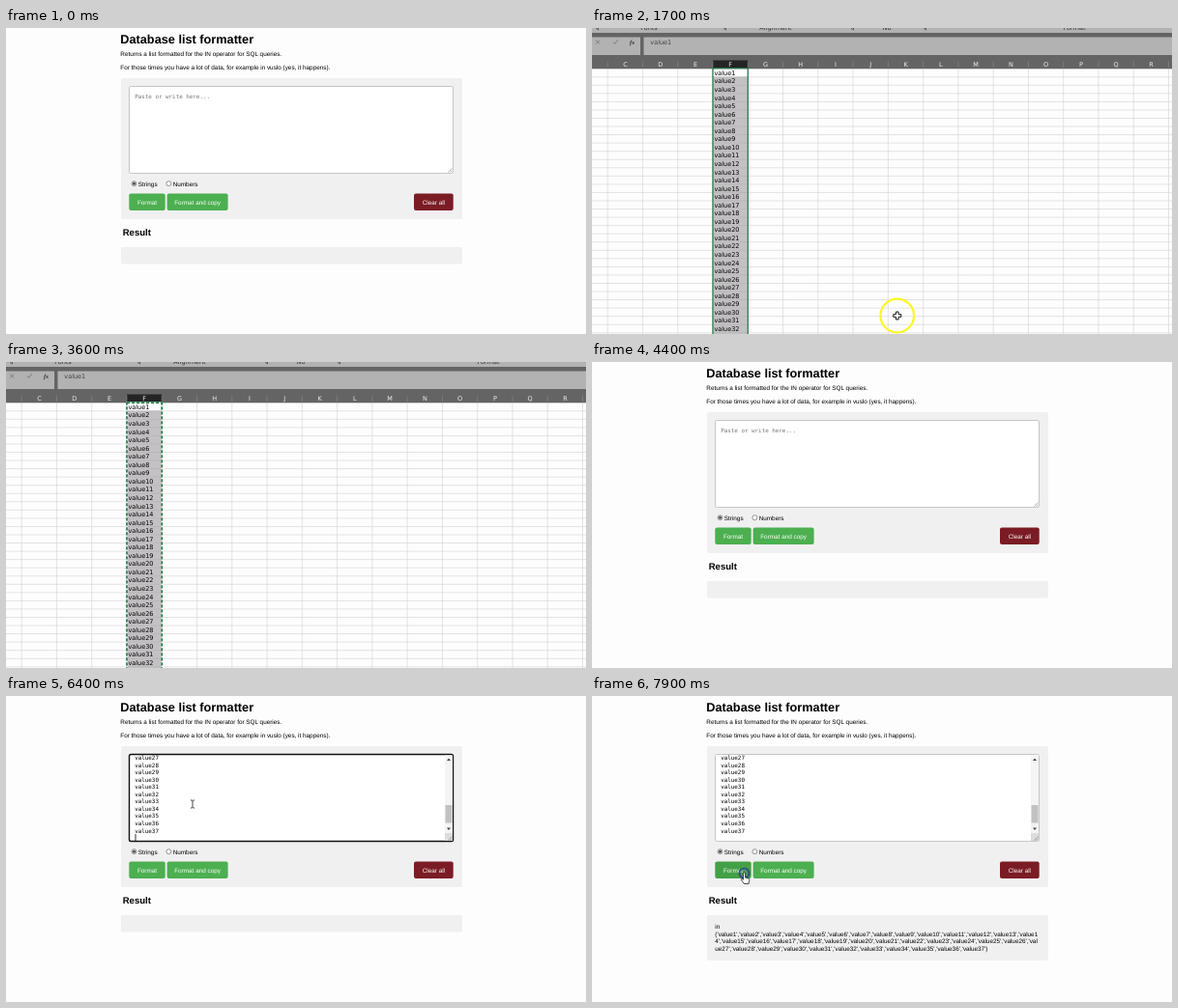
Recreate the animation shown at these times as an HTML page. Size 600x317 px, loop 8000 ms.

```html
<!DOCTYPE html>
<html lang="en">
<head>
<meta charset="utf-8">
<title>Database list formatter</title>
<style>
  html, body { margin: 0; width: 100%; height: 100%; overflow: hidden; background: #fefdfe; }
  svg { display: block; width: 600px; height: 317px; text-rendering: geometricPrecision; }
  .sans { font-family: "Liberation Sans", Arial, sans-serif; font-size: 6.37px; }
  .mono { font-family: "DejaVu Sans Mono", monospace; font-size: 5.88px; }
  .cell { font-family: "DejaVu Sans", sans-serif; font-size: 6.5px; }
</style>
</head>
<body>
<svg id="stage" viewBox="0 0 600 317"></svg>
<script>
const stage = document.getElementById('stage');
const range = (n, fn) => Array.from({ length: n }, (_, i) => fn(i)).join('');
const rect = (x, y, w, h, fill, extra = '') =>
  `<rect x="${x}" y="${y}" width="${w}" height="${h}" fill="${fill}" ${extra}/>`;
const text = (x, y, str, kind = 'sans', extra = '') =>
  `<text x="${x}" y="${y}" class="${kind}" ${extra}>${str}</text>`;
const path = (d, stroke, width = 1, extra = '') =>
  `<path d="${d}" fill="none" stroke="${stroke}" stroke-width="${width}" ${extra}/>`;
const group = (id, content) => `<g id="${id}">${content}</g>`;

// Web page
const button = (id, x, w, label, fill) =>
  rect(x, 171.5, w, 17.5, fill, `rx="2" id="${id}"`) +
  text(x + w / 2, 182.7, label, 'sans', 'fill="#fff" text-anchor="middle"');
const radio = (x, label, dot) =>
  `<circle cx="${x}" cy="161.2" r="2.5" fill="#fff" stroke="#666" stroke-width=".7"/>` +
  (dot ? `<circle cx="${x}" cy="161.2" r="1.6" fill="#555"/>` : '') + text(x + 4.3, 164, label);

const list = `('${Array.from({ length: 37 }, (_, i) => 'value' + (i + 1)).join("','")}')`;
const breaks = [0, list.indexOf("4','value15"), list.indexOf("ue27'"), list.length];
const resultLines = ['in', ...[0, 1, 2].map(i => list.slice(breaks[i], breaks[i + 1]))];

const pageMarkup =
  rect(0, 0, 600, 317, '#fefdfe') +
  text(118.3, 15.6, 'Database list formatter', 'sans', 'style="font-size:12.73px;font-weight:bold"') +
  text(118.3, 29.4, 'Returns a list formatted for the IN operator for SQL queries.') +
  text(118.3, 43.4, 'For those times you have a lot of data, for example in vuslo (yes, it happens).') +
  rect(119, 52, 353, 146, '#f1f0f1', 'rx="2"') +
  rect(127.5, 60.5, 335, 90, '#fff', 'rx="1.8" stroke="#c6c6c6" id="box"') +
  group('placeholder', text(133.2, 72.7, 'Paste or write here...', 'mono', 'fill="#757575"')) +
  group('pasted',
    '<clipPath id="inner"><rect x="128" y="61" width="334" height="89"/></clipPath>' +
    `<g clip-path="url(#inner)">${range(11, i => text(133.2, 66 + i * 7.56, 'value' + (27 + i), 'mono'))}</g>` +
    rect(454, 61.5, 8, 80.5, '#f4f4f4') + rect(454.5, 113, 7, 18.5, '#c1c1c1') +
    rect(454, 142, 8, 8, '#dcdcdc') +
    '<path d="M456 67l2-2.4 2 2.4zM456 136.6l2 2.4 2-2.4z" fill="#444"/>') +
  path('M457.5 149.5l4-4M459.8 149.5l1.7-1.7', '#777', .6) +
  rect(133.6, 143, .8, 7, '#000', 'id="caret"') +
  radio(132.5, 'Strings', true) + radio(168.4, 'Numbers') +
  button('format', 127.3, 37.4, 'Format', '#4caf50') +
  button('copy', 166.6, 63, 'Format and copy', '#4caf50') +
  button('clear', 422, 40.7, 'Clear all', '#7b1c24') +
  text(120.7, 215.2, 'Result', 'sans', 'style="font-size:9.55px;font-weight:bold"') +
  rect(119, 227, 353, 17.5, '#f1f0f1', 'rx="1.5" id="panel"') +
  group('result', resultLines.map((line, i) => text(127.3, 241 + i * 7.5, line)).join(''));

// Spreadsheet
const colW = 36.27, rowH = 8.55, left = 125, top0 = 42.2;
const column = `M${left} ${top0 - 1}V318M${left + colW} ${top0 - 1}V318`;
const green = '#217346';

const sheetMarkup =
  rect(0, 0, 600, 317, '#fefdfe') +
  path(range(33, i => `M0 ${top0 + i * rowH}H600`) +
       range(17, i => `M${left + (i - 3) * colW} ${top0}V317`), '#d9d7d9', .7) +
  rect(0, 0, 600, top0, '#646464') +
  rect(0, 0, 600, 5, '#b2b2b2') +
  rect(0, 9.5, 50, 18.5, '#b2b2b2') + rect(53.5, 9.5, 547, 18.5, '#b2b2b2') +
  [['Fonts', 59], ['Alignment', 190], ['No', 305], ['Format', 499]]
    .map(([label, x]) => text(x, 1.5, label, 'cell', 'fill="#333" text-anchor="middle"')).join('') +
  path([4, 136, 268, 343].map(x => `M${x} 0l2.5 2v-2`).join(''), '#444', .8) +
  path('M4 12.5l4 4m0-4l-4 4M22 14.5l1.5 2 3.5-4.5', '#777', .9) +
  text(39, 17, 'fx', 'sans', 'style="font-family:\'Liberation Serif\',serif;font-style:italic;font-weight:bold" fill="#333"') +
  text(60.3, 17, 'value1', 'cell', 'fill="#444"') +
  rect(left, 33.5, colW, 8.2, '#242424') +
  path(range(17, i => `M${left + (i - 3) * colW} 34.5V41`), '#8a8a8a', .6) +
  range(16, i => text(34.4 + i * colW, 40.3, String.fromCharCode(67 + i), 'cell',
    'fill="#eee" text-anchor="middle"')) +
  rect(left, top0 + rowH, colW, 280, '#c3c1c3') +
  path(range(32, i => `M${left} ${top0 + (i + 1) * rowH}h${colW}`), '#b2b0b2', .6) +
  range(32, i => text(126.4, 48.9 + i * rowH, 'value' + (i + 1), 'cell')) +
  path(column + `M${left} ${top0 - .5}h${colW}`, green, 1.2) +
  group('ants', path(column + `M${left} ${top0}h${colW}`, '#fff', 1.6) +
    path(column + `M${left} ${top0}h${colW}`, green, 1.6, 'stroke-dasharray="3.2 1.8"'));

// Pointers, each with its hot spot at 0,0
const pointers =
  group('cross', '<circle r="17.3" fill="none" stroke="#fbf725" stroke-width="2.2"/>' +
    '<path d="M-1.3-4h2.6v2.7h2.7v2.6h-2.7v2.7h-2.6v-2.7h-2.7v-2.6h2.7z" fill="#fff" stroke="#111"/>') +
  group('beam', path('M-2-4h1.4l.6.6.6-.6H2M0-3.5v7M-2 4h1.4l.6-.6.6.6H2', '#333', .9)) +
  group('arrow', '<path d="M0 0v9l2.1-2 1.6 3.4 1.4-.7-1.5-3.2h2.8z" fill="#fff" stroke="#222" stroke-width=".7"/>') +
  group('hand', '<circle id="ring" cx="0" cy="0" fill="#5575c033" stroke="#2c4a85" stroke-width="1.7"/>' +
    '<path d="M-1 0.5q0-1.2 1-1.2t1 1.2v4l3.6.9q1 .3.8 1.5L4.6 11H-.2L-3.4 6.6q.6-1.4 2.4.2z" fill="#fff" stroke="#222" stroke-width=".8"/>');

stage.innerHTML = group('page', pageMarkup) + group('sheet', sheetMarkup) + group('pointer', pointers);

const el = id => document.getElementById(id);
const show = (id, on) => { el(id).style.display = on ? '' : 'none'; };
const fill = (id, colour) => el(id).setAttribute('fill', colour);

// Pointer journeys as [time, x, y]; hidden between journeys
const journeys = [
  [[1400, 363, 322], [1800, 300, 290], [2300, 225, 267], [2600, 223, 268], [3000, 212, 292], [3400, 200, 338]],
  [[4800, 205, 265], [5200, 198, 165], [5500, 193, 112], [6600, 193, 112], [7100, 181, 176],
   [7400, 160, 185], [7500, 157.5, 183.5], [8000, 157.5, 183.5]]
];

function locate(t) {
  for (const steps of journeys) {
    for (let i = 1; i < steps.length; i++) {
      const [t0, x0, y0] = steps[i - 1], [t1, x1, y1] = steps[i];
      if (t < t0 || t >= t1) continue;
      const k = (t - t0) / (t1 - t0);
      return [x0 + (x1 - x0) * k, y0 + (y1 - y0) * k];
    }
  }
  return null;
}

function draw(now) {
  const t = Math.floor(now % 8000 / 100) * 100;
  const onSheet = t >= 800 && t < 4200;
  const focused = t >= 5500 && t < 7600;
  const pasted = t >= 5800;
  const done = t >= 7700;

  show('sheet', onSheet);
  show('ants', t >= 3500);
  show('placeholder', !pasted);
  show('pasted', pasted);
  show('caret', focused);
  el('caret').setAttribute('y', pasted ? 143 : 66.5);
  el('box').setAttribute('stroke', focused ? '#111' : '#c6c6c6');
  el('box').setAttribute('stroke-width', focused ? 1.4 : 1);
  show('result', done);
  el('panel').setAttribute('height', done ? 47 : 17.5);

  const at = locate(t);
  show('pointer', at);
  const [x, y] = at || [0, 0];
  const inRow = !onSheet && y > 171 && y < 189;
  const overFormat = inRow && x > 127 && x < 165;
  const overCopy = inRow && x > 166 && x < 230;
  const inBox = y > 60 && y < 151;
  const shape = onSheet ? 'cross' : inBox ? 'beam' : overFormat || overCopy ? 'hand' : 'arrow';
  el('pointer').setAttribute('transform', `translate(${x} ${y})`);
  for (const id of ['cross', 'beam', 'arrow', 'hand']) show(id, id === shape);
  fill('format', overFormat ? '#43a047' : '#4caf50');
  fill('copy', overCopy ? '#43a047' : '#4caf50');
  show('ring', t >= 7600);
  el('ring').setAttribute('r', Math.max(0, Math.min(5, 2 + (t - 7600) / 100)));

  requestAnimationFrame(draw);
}
requestAnimationFrame(draw);
</script>
</body>
</html>
```
